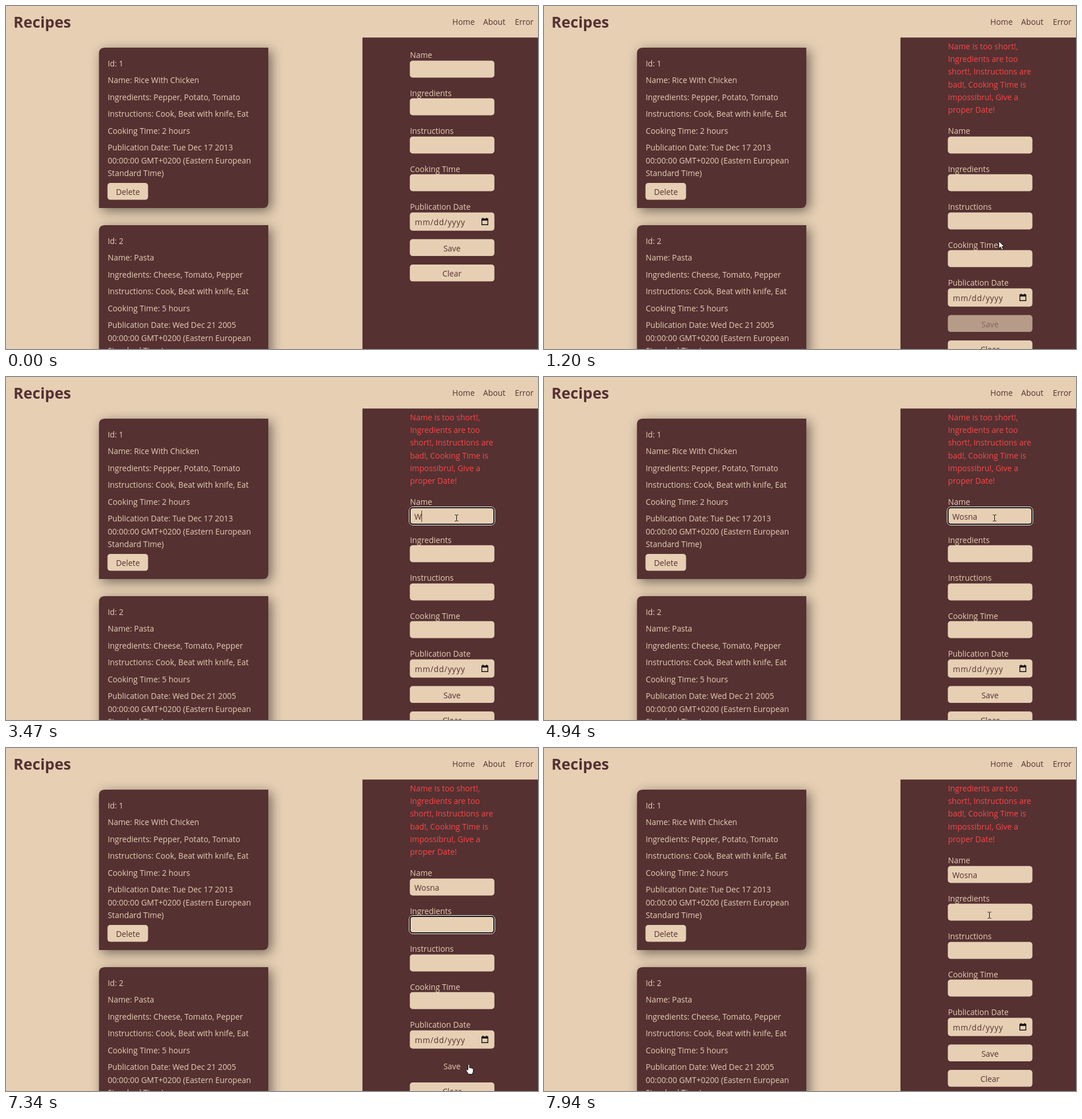
Write an HTML page that moves like this. It is 931 px wide and 601 px high and loops after 8000 ms.

```html
<!DOCTYPE html>
<html lang="en">
<head>
<meta charset="utf-8">
<title>Recipes</title>
<style>
html, body { margin: 0; width: 100%; height: 100%; overflow: hidden; background: #e6cfb3; }
svg { display: block; width: 931px; height: 601px; }
text { font: 13.85px "Open Sans", "Noto Sans", sans-serif; fill: #e6cfb3; white-space: pre; }
.dark { fill: #553132; }
.mid { text-anchor: middle; }
.error { fill: #fb4646; }
.card { fill: #553132; filter: drop-shadow(5px 5px 10px rgba(0, 0, 0, .5)); }
.box { fill: #e6cfb3; }
.title { font-size: 26.6px; font-weight: 700; }
.cursor path { fill: #fff; stroke: #111; stroke-width: 1; stroke-linejoin: round; }
.cursor .beam { fill: none; }
</style>
</head>
<body>
<svg id="stage" viewBox="0 0 931 601"></svg>
<script>
const TAN = [230, 207, 179], BROWN = [85, 49, 50];
const LOOP = 8000, FADE = 150, LINE = 22.2;
const ERRORS = [
  ["Name is too short!,", "Ingredients are too", "short!, Instructions are", "bad!, Cooking Time is", "impossibru!, Give a", "proper Date!"],
  ["Ingredients are too", "short!, Instructions are", "bad!, Cooking Time is", "impossibru!, Give a", "proper Date!"]
];
const FIELDS = ["Name", "Ingredients", "Instructions", "Cooking Time", "Publication Date"];
const TYPED = "Wosna", KEYS = [3470, 3940, 4070, 4210, 4340];
const CLICK = { save1: 1100, name: 1930, ingredients: 6600, save2: 7465 };
const HOVER = {
  Save: [[870, CLICK.save1], [7190, CLICK.save2]],
  Clear: [[660, 740], [6870, 7050]]
};
const CARET = [[CLICK.name, 2480], [2940, 4940], [5410, 5940], [6440, 7100]];
// Pointer path: time, x, y
const PATH = [
  [330, 876, 598], [860, 798, 409], [1130, 797, 417], [1300, 795, 405], [1800, 783, 252],
  [1940, 779, 245], [2010, 788, 247], [5900, 788, 247], [6150, 790, 226], [6500, 793, 300],
  [6730, 796, 312], [6870, 805, 597], [7000, 806, 596], [7200, 808, 562], [7400, 811, 551],
  [7480, 811, 551], [7880, 780, 300], [7940, 779, 293]
];

const text = (x, y, s, cls = "") => `<text x="${x}" y="${Math.round(y)}" class="${cls}">${s}</text>`;
const box = (x, y, w, h, id = "") => `<rect id="${id}" x="${x}" y="${y}" width="${w}" height="${h}" rx="5" class="box"/>`;
const fieldY = i => Math.round(95.6 + 66.6 * i);

function card(y, rows) {
  const date = rows.pop();
  const lines = rows.map((s, i) => text(178, y + 32.5 + 29.6 * i, s)).join("");
  const dates = date.map((s, i) => text(178, y + 180.4 + LINE * i, s)).join("");
  return `<path class="card" d="M162.7 ${y + 10}q0-10 10-10H459V${y + 271}q0 10-10 10H162.7z"/>` + lines + dates +
    box(177.6, y + 237, 71, 29.6) + text(213.3, y + 258, "Delete", "dark mid");
}

function recipe(y, id, name, ingredients, hours, day) {
  return card(y, [`Id: ${id}`, `Name: ${name}`, `Ingredients: ${ingredients}`,
    "Instructions: Cook, Beat with knife, Eat", `Cooking Time: ${hours} hours`,
    [`Publication Date: ${day}`, "00:00:00 GMT+0200 (Eastern European", "Standard Time)"]]);
}

const button = (name, y) => box(706.7, y, 148, 29.6, "box" + name) +
  `<text id="label${name}" class="mid" x="780.5" y="${Math.round(y + 21)}">${name}</text>`;

const $ = id => document.getElementById(id);
$("stage").innerHTML =
  text(13, 38, "Recipes", "dark title") +
  text(781, 33, "Home", "dark") + text(835, 33, "About", "dark") + text(890.5, 33, "Error", "dark") +
  recipe(73, 1, "Rice With Chicken", "Pepper, Potato, Tomato", 2, "Tue Dec 17 2013") +
  recipe(384, 2, "Pasta", "Cheese, Tomato, Pepper", 5, "Wed Dec 21 2005") +
  `<path class="dark" d="M623.8 55.3H931V601H623.8z"/>` +
  ERRORS.map((list, n) => `<g id="errors${n}">` + list.map((s, i) => text(707, 76 + LINE * i, s, "error")).join("") + "</g>").join("") +
  `<g id="form">` +
  FIELDS.map((s, i) => text(707, 91 + 66.6 * i, s) + box(706.7, fieldY(i) - .2, 148, i < 4 ? 29.6 : 32)).join("") +
  `<text class="dark" x="715.5" y="384" letter-spacing=".75">mm/dd/yyyy</text>
  <path d="M832.7 373.5h10.6v9.8h-10.6z" fill="none" stroke="#111" stroke-width="1.4"/>
  <path d="M832 372.5h12v3.5h-12zM834 371h1.6v2H834zM840.4 371h1.6v2h-1.6z" fill="#111"/>` +
  button("Save", 408.5) + button("Clear", 453) +
  `<g id="ring" fill="none"><rect x="705.5" y="-1.5" width="150" height="32" rx="6.5" stroke="#fff"/>
  <rect x="707" y="0" width="147" height="29" rx="5" stroke="#111" stroke-width="2"/></g>
  <text id="typed" class="dark" x="714.5" y="117"></text>
  <path id="caret" d="M.5 0v20" stroke="#553132"/></g>
  <g id="cursor" class="cursor">
  <path id="arrow" d="M0 0v13l3-2.8 2.2 4.8 2.3-1-2.2-4.6H9.5z"/>
  <path id="hand" d="M-1.5 10V1.3q1.2-2 2.6 0V6.5q1.5-.8 2.3.4 1.5-.7 2.2.5 1.8-.3 2.1 1.3V13l-1.7 4.5H-.7L-5 10.8q.5-2.3 2.3-.8z"/>
  <path id="beam" class="beam" d="M-2.5-5.5H-1L.5-4.5 2-5.5H3.5M.5-4.5V4.5M-2.5 5.5H-1L.5 4.5 2 5.5H3.5"/></g>`;

const show = (id, on) => $(id).setAttribute("visibility", on ? "visible" : "hidden");
const move = (id, x, y) => $(id).setAttribute("transform", `translate(${x} ${y})`);
const within = (t, spans) => spans.some(([a, b]) => t >= a && t < b);
const mix = (a, b, k) => `rgb(${a.map((v, i) => v + (b[i] - v) * k)})`;

function hover(t, spans) {
  return Math.max(...spans.map(([a, b]) => {
    if (t < a) return 0;
    return Math.max(0, Math.min(1, (Math.min(t, b) - a) / FADE) - Math.max(0, t - b) / FADE);
  }));
}

function position(t) {
  const i = PATH.findIndex(p => p[0] > t);
  if (i < 0) return PATH.at(-1).slice(1);
  if (!i) return PATH[0].slice(1);
  const [t0, x0, y0] = PATH[i - 1], [t1, x1, y1] = PATH[i];
  const k = (t - t0) / (t1 - t0);
  return [Math.round(x0 + (x1 - x0) * k), Math.round(y0 + (y1 - y0) * k)];
}

function shape(x, y) {
  const inside = (top, h) => x >= 707 && x < 855 && y >= top && y < top + h;
  if (inside(408, 30) || inside(453, 30)) return "hand";
  return [0, 1, 2, 3].some(i => inside(fieldY(i), 30)) ? "beam" : "arrow";
}

function draw(t) {
  const state = t < CLICK.save1 ? -1 : t < CLICK.save2 ? 0 : 1;
  const shift = [0, 133, 111][state + 1];
  show("errors0", state === 0);
  show("errors1", state === 1);
  move("form", 0, shift);

  for (const name in HOVER) {
    const k = hover(t, HOVER[name]);
    $("box" + name).style.fill = mix(TAN, BROWN, k);
    $("label" + name).style.fill = mix(BROWN, TAN, k);
  }

  const focus = t < CLICK.ingredients ? 0 : 1;
  const focused = t >= CLICK.name && t < CLICK.save2;
  const typed = $("typed");
  typed.textContent = TYPED.slice(0, KEYS.filter(k => t >= k).length);
  show("ring", focused);
  move("ring", 0, fieldY(focus));
  show("caret", focused && within(t, CARET));
  const width = focus || !typed.textContent ? 0 : typed.getComputedTextLength();
  move("caret", Math.round(714 + width), fieldY(focus) + 5);

  const [x, y] = position(t);
  const kind = shape(x, y - shift);
  move("cursor", x, y);
  for (const id of ["arrow", "hand", "beam"]) show(id, t >= 330 && id === kind);
}

const start = performance.now();
function tick() {
  draw((performance.now() - start) % LOOP);
  requestAnimationFrame(tick);
}
tick();
</script>
</body>
</html>
```
